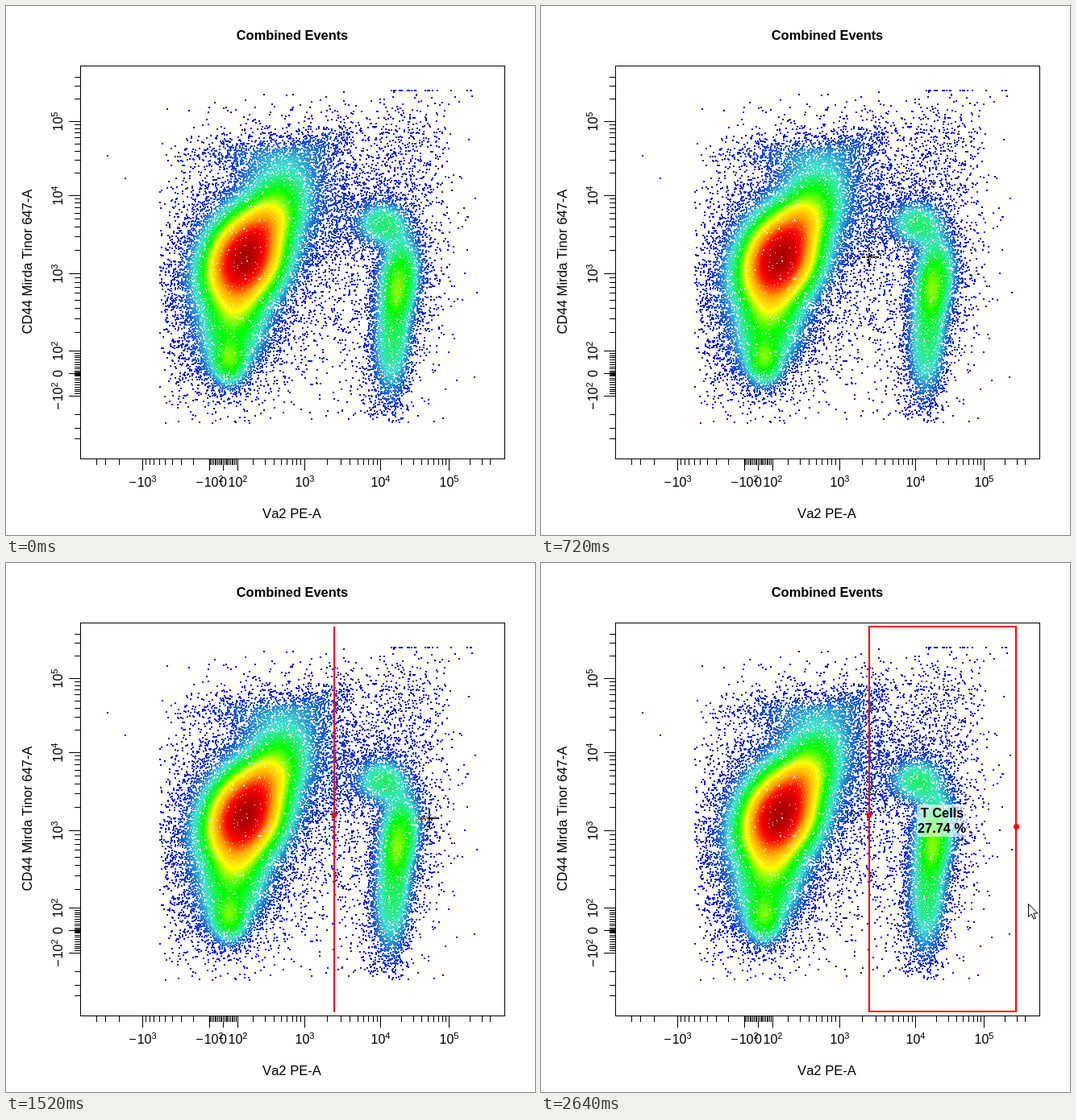
These frames come from a looping animation (656 by 657 pixels, 2790 ms). An HTML page with a canvas:

```html
<!DOCTYPE html>
<html lang="en">
<head>
<meta charset="utf-8">
<title>Gating plot</title>
<style>
  html, body { margin: 0; width: 100%; height: 100%; overflow: hidden; background: #fff; }
  #stage { position: relative; width: 656px; height: 657px; overflow: hidden; background: #fff; isolation: isolate; }
  canvas, svg, #cross { position: absolute; left: 0; top: 0; }
  text { font: 16.4px Arial, "Liberation Sans", sans-serif; font-kerning: none; text-anchor: middle; }
  .bold { font-weight: bold; }
  .label { font-size: 16.6px; }
  .tick { font-size: 16px; }
  .exp { font-size: 11px; }
  .axis { fill: none; stroke: #000; shape-rendering: crispEdges; }
  .gate { fill: none; stroke: #f00; stroke-width: 2; }
  .dot { fill: #f00; }
  #cross {
    width: 24px; height: 24px; margin: -12px 0 0 -12px; mix-blend-mode: difference;
    background:
      linear-gradient(#fff, #fff) 11px 0 / 2px 24px no-repeat,
      linear-gradient(#fff, #fff) 0 11px / 24px 2px no-repeat;
  }
</style>
</head>
<body>
<div id="stage">
  <canvas id="plot" width="656" height="657"></canvas>
  <svg width="656" height="657" viewBox="0 0 656 657">
    <rect class="axis" x="92.5" y="74.5" width="526" height="488"/>
    <g id="axes"></g>
    <text class="bold" x="355" y="42">Combined Events</text>
    <text class="label" x="354.5" y="636">Va2 PE-A</text>
    <text class="label" transform="translate(32 317.5) rotate(-90)">CD44 Mirda Tinor 647-A</text>
    <g id="first">
      <path class="gate" d="M407 79V558"/>
      <circle class="dot" cx="407" cy="313" r="3.5"/>
    </g>
    <g id="second">
      <rect class="gate" x="407" y="79" width="182" height="478"/>
      <circle class="dot" cx="589.5" cy="327.5" r="3.5"/>
      <rect x="466" y="300" width="63" height="40" fill="#fff" opacity=".6"/>
      <text class="bold" x="497.5" y="316">T Cells</text>
      <text class="bold" x="497" y="335">27.74 %</text>
    </g>
    <path id="arrow" d="M0 0V16L3.8 12.4L6.4 18.6L8.8 17.6L6.2 11.6H11.3Z" fill="#fff" stroke="#000"/>
  </svg>
  <div id="cross"></div>
</div>
<script>
const $ = id => document.getElementById(id);

let seed = 41;
const random = () => {
  seed = (seed + 0x6D2B79F5) | 0;
  let n = Math.imul(seed ^ seed >>> 15, 1 | seed);
  n = n + Math.imul(n ^ n >>> 7, 61 | n) ^ n;
  return ((n ^ n >>> 14) >>> 0) / 4294967296;
};
const between = (a, b) => Math.round(a + (b - a) * random());

// A leaning cloud of events: a flat-topped core with a thin wide tail
const cloud = (lean, cx, cy, sx, sy, weight) => (x, y) => {
  const dy = y - cy, r2 = ((x - cx + lean * dy) / sx) ** 2 + (dy / sy) ** 2;
  return weight * (Math.exp(-(r2 ** 1.25) / 2) + .06 * Math.exp(-r2 / 5));
};
const clouds = [
  cloud(.22, 295, 313, 36, 46, 1),
  cloud(.2, 338, 248, 26, 28, .27),
  cloud(.15, 281, 405, 28, 34, .28),
  cloud(0, 276, 445, 15, 19, .25),
  cloud(.2, 340, 205, 36, 20, .1),
  cloud(0, 318, 183, 60, 11, .055),
  cloud(1, 392, 167, 22, 13, .04),
  cloud(0, 466, 270, 21, 18, .24),
  cloud(.08, 488, 335, 17, 34, .31),
  cloud(.05, 479, 405, 16, 53, .26),
  cloud(0, 402, 250, 34, 42, .025),
  cloud(.1, 495, 195, 30, 52, .016),
  cloud(0, 425, 300, 70, 110, .006)
];
const density = (x, y) => clouds.reduce((sum, at) => sum + at(x, y), 0);

const ramp = [[0, 0, 215], [64, 224, 208], [0, 255, 0], [255, 255, 0], [255, 165, 0], [255, 0, 0], [139, 0, 0]];
const color = d => {
  const p = Math.min(d / 1.12, .9999) * (ramp.length - 1), i = Math.floor(p);
  return `rgb(${ramp[i].map((c, k) => Math.round(c + (ramp[i + 1][k] - c) * (p - i)))})`;
};

const ctx = $('plot').getContext('2d');
const point = (x, y, d = 0) => {
  ctx.fillStyle = color(d);
  ctx.fillRect(x, y, 2, 2);
};
for (let y = 106; y < 518; y++)
  for (let x = 190; x < 590; x++) {
    const d = density(x, y);
    if (random() < .64 * (1 - Math.exp(-5 * d))) point(x, y, d);
  }
for (let i = 0; i < 10; i++) point(between(530, 586), between(190, 470));
for (let i = 0; i < 22; i++) point(between(446, 582), 104);
point(125, 185);
point(147, 213);

// Axes: linear near zero, logarithmic further out
const xAxis = { zero: 269.5, dir: 1, decades: [17.5, 100.5, 195, 280], min: -4000 };
const yAxis = { zero: 456.5, dir: -1, decades: [28, 124, 221, 313], min: -400 };

const bend = v => Math.asinh(v / 150);
const place = ({ zero, dir, decades }, value) => {
  const a = Math.abs(value);
  let off = decades[0] * a / 100;
  if (a > 100) {
    const i = Math.min(Math.floor(Math.log10(a) + 1e-9) - 2, 2), low = 10 ** (i + 2);
    const scale = i ? Math.log : bend;
    const f = (scale(a) - scale(low)) / (scale(low * 10) - scale(low));
    off = decades[i] + (decades[i + 1] - decades[i]) * f;
  }
  return Math.floor(zero + dir * Math.sign(value) * off) + .5;
};

const tickValues = axis => {
  const list = [];
  for (let v = -90; v <= 90; v += 10) list.push([v, v === 0]);
  for (let e = 2; e < 6; e++)
    for (let k = 1; k < 10; k++)
      for (const v of [k * 10 ** e, -k * 10 ** e])
        if (v <= 4e5 && v >= axis.min) list.push([v, k === 1]);
  return list;
};

const power = v => {
  if (!v) return '0';
  const e = Math.round(Math.log10(Math.abs(v)));
  return `${v < 0 ? '−<tspan dx="1">10</tspan>' : '10'}<tspan class="exp" dy="-6">${e}</tspan>`;
};

let marks = '', labels = '';
for (const [v, major] of tickValues(xAxis)) {
  const x = place(xAxis, v);
  marks += `M${x} 562v${major ? 15 : 8}`;
  if (major) labels += `<text class="tick" x="${x}" y="597">${power(v)}</text>`;
}
for (const [v, major] of tickValues(yAxis)) {
  const y = place(yAxis, v);
  marks += `M92 ${y}h${major ? -14 : -7}`;
  if (major) labels += `<text class="tick" transform="translate(70 ${y}) rotate(-90)">${power(v)}</text>`;
}
$('axes').innerHTML = `<path class="axis" d="${marks}"/><path d="M85 454.5h7v5h-7z"/>${labels}`;

// Pointer stops: time, x, y
const stops = [
  [160, 505, 643], [400, 466, 360], [640, 407, 312], [1200, 407, 312],
  [1520, 525, 317], [2240, 589, 327], [2640, 605, 423]
];
const pointer = t => {
  const i = Math.max(1, stops.findIndex(s => s[0] >= t));
  const [a, b] = [stops[i - 1], stops[i]];
  const f = Math.max(0, (t - a[0]) / (b[0] - a[0])), eased = 1 - (1 - f) ** 1.5;
  return [1, 2].map(k => Math.round(a[k] + (b[k] - a[k]) * eased));
};
const show = (id, on) => { $(id).style.visibility = on ? 'visible' : 'hidden'; };

const draw = ms => {
  const t = Math.min(Math.floor(ms % 2790 / 80) * 80, 2640);
  const [x, y] = pointer(t), done = t >= 2320;
  show('first', t >= 1200);
  show('second', done);
  show('cross', t >= 160 && !done);
  show('arrow', done);
  $('cross').style.transform = `translate(${x}px, ${y}px)`;
  $('arrow').setAttribute('transform', `translate(${x - .5} ${y + .5})`);
};

let start;
const tick = now => {
  start ??= now;
  draw(now - start);
  requestAnimationFrame(tick);
};
draw(0);
requestAnimationFrame(tick);
</script>
</body>
</html>
```
